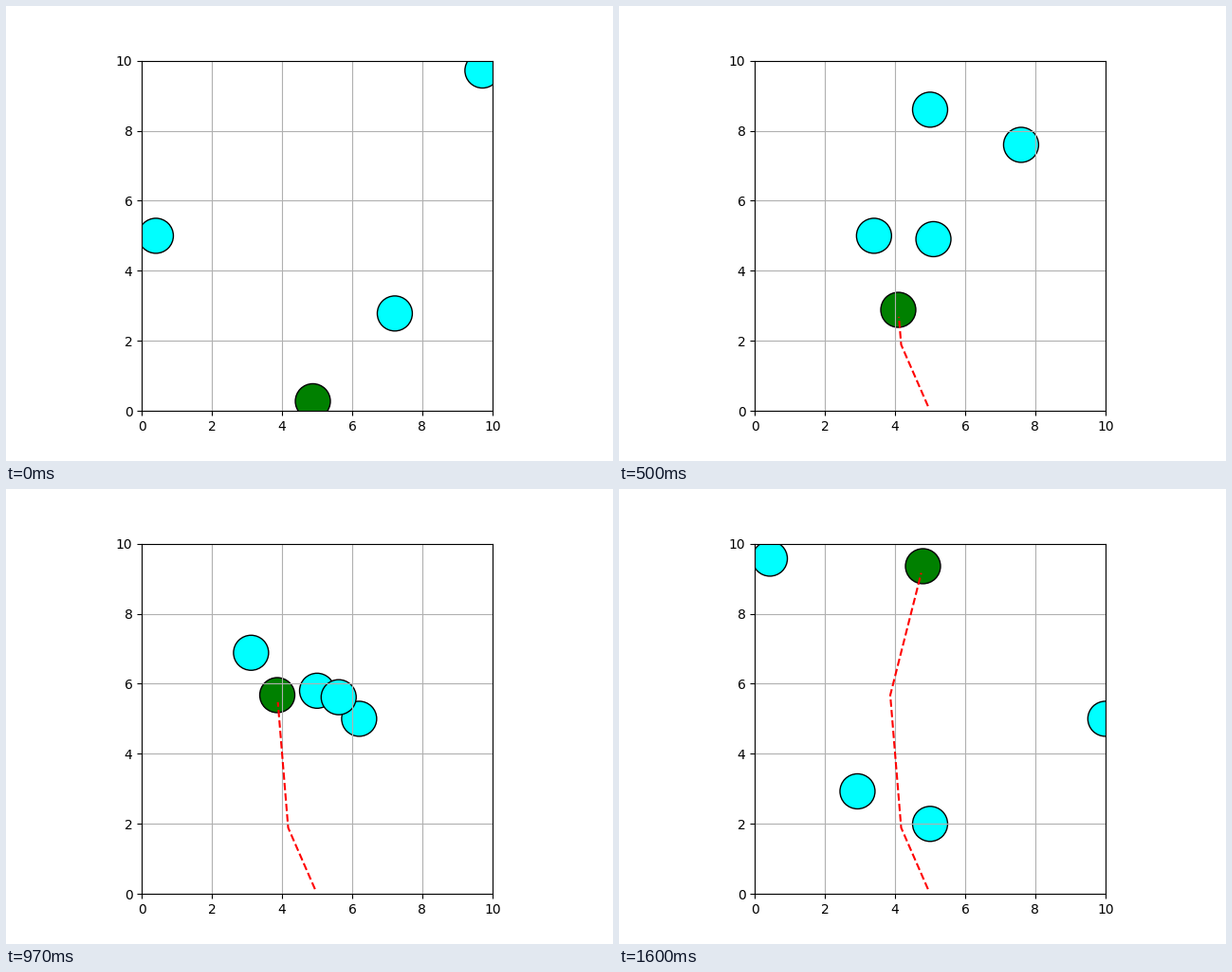
Recreate the animation shown at these times as a matplotlib script. Size 640 by 480 pixels, loop 1.63 s.

```python
import numpy as np
import matplotlib.pyplot as plt
from matplotlib.animation import FuncAnimation

FRAMES = 49
LOOP_MS = 1630
RADIUS = 0.5
SPEED = 0.2
DIAG = SPEED / np.sqrt(2)

# Obstacles: start point and step per frame
OBSTACLES = [
    ((0, 5), (SPEED, 0)),
    ((5, 12), (0, -SPEED)),
    ((10, 10), (-DIAG, -DIAG)),
    ((7.5, 2.5), (-DIAG, DIAG)),
]

# Robot route: corner points and the step at which each is reached
CORNERS = np.array([(5, 0), (4.175, 1.89), (3.864, 5.675), (4.797, 9.355)])
CORNER_STEPS = np.array([0, 12, 31, 50])


def robot_path(steps):
    """Robot positions; the first leg picks up speed gently."""
    first = CORNER_STEPS[1]
    u = steps / first
    s = np.where(u < 1, first * (0.856 * u + 0.144 * u**2), steps)
    return np.column_stack(
        [np.interp(s, CORNER_STEPS, CORNERS[:, i]) for i in range(2)])


def add_disc(color):
    return ax.add_patch(plt.Circle((0, 0), RADIUS, fc=color, ec="black"))


fig, ax = plt.subplots(figsize=(6.4, 4.8), dpi=100)
ax.set_xlim(0, 10)
ax.set_ylim(0, 10)
ax.set_aspect("equal")
ax.grid(True)

robot = add_disc("green")
discs = [add_disc("cyan") for _ in OBSTACLES]
trail, = ax.plot([], [], "r--")


def update(frame):
    step = frame + 2
    for disc, (start, velocity) in zip(discs, OBSTACLES):
        disc.center = tuple(np.array(start) + step * np.array(velocity))
    path = robot_path(np.arange(1, step + 1))
    robot.center = tuple(path[-1])
    # The trail ends one step behind the robot
    trail.set_data(path[:-1, 0], path[:-1, 1])
    return [robot, *discs, trail]


anim = FuncAnimation(fig, update, frames=FRAMES, interval=LOOP_MS / FRAMES,
                     repeat=True, repeat_delay=0)
plt.show()
```
